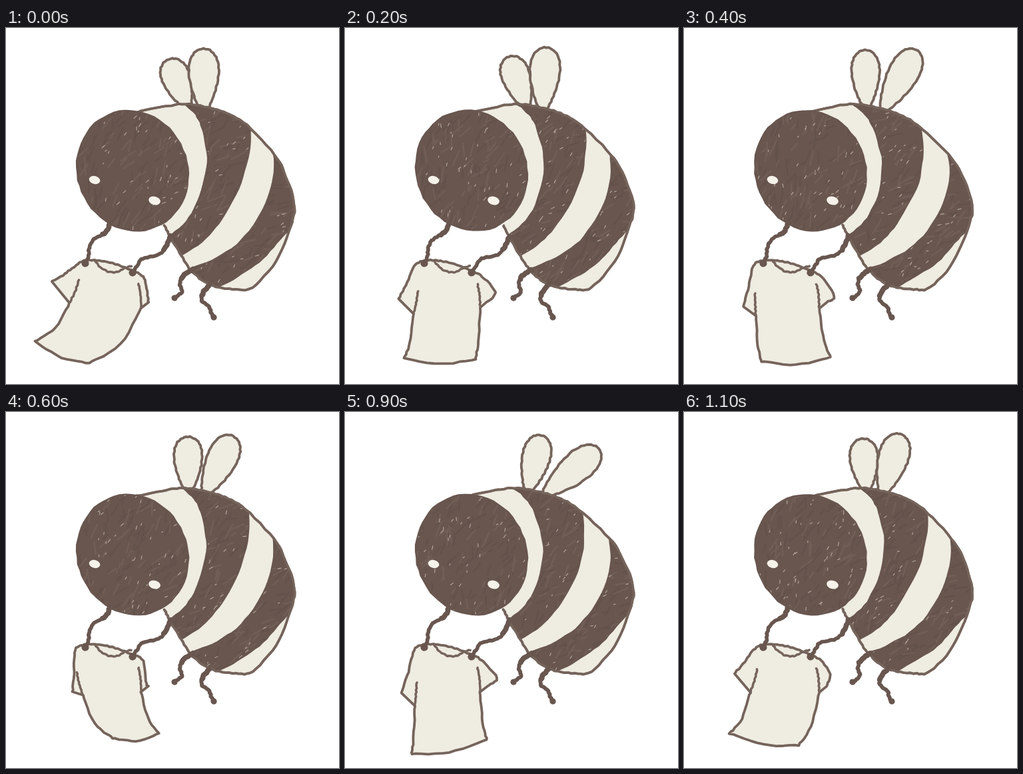
These frames come from a looping animation (500x534 px, 1200 ms). An HTML page with a canvas:

```html
<!DOCTYPE html>
<html lang="en">
<head>
<meta charset="utf-8">
<title>Bee shaking out a shirt</title>
<style>
html, body { margin: 0; width: 100%; height: 100%; overflow: hidden; background: #fff; }
canvas { display: block; }
</style>
</head>
<body>
<canvas id="stage" width="500" height="534"></canvas>
<script>
const ctx = document.getElementById('stage').getContext('2d');
const CREAM = '#efece2', LINE = '#75645b', DARK = '#68564f';
const STEP = 100;

const points = s => s.split(' ').map(p => p.split(',').map(Number));

// Each pose: tips of both wings, then both corners of the shirt's hem
const poses = [
  '244,47 297,31 43,470 125,503',
  '268,40 325,33 68,482 172,500',
  '246,43 302,29 89,495 196,497',
  '295,35 381,55 100,513 213,492',
  '272,33 349,33 116,500 220,494',
  '273,35 346,34 137,497 226,489',
  '273,37 341,36 160,489 230,482'
].map(points);

const BODY = points('191,126 230,118 262,114 295,119 325,128 356,146 400,190 419,222 433,265 427,298 405,350 370,389 345,392 315,388 294,378 275,360 261,338 246,312 238,296');
const FRONT_BAND = [
  points('256,111 278,130 291,156 300,202 291,252 271,290 241,315'),
  points('360,142 362,179 352,232 324,286 294,321 260,343')
];
const BACK_BAND = [
  points('399,187 400,224 386,271 353,319 310,348 268,364'),
  points('437,290 411,317 380,351 340,377 304,396')
];
const ARMS = [
  points('156,293 150,306 132,317 125,330 124,342 119,353'),
  points('247,312 240,328 229,340 205,346 198,355 190,367')
];
const LEGS = [
  points('280,362 266,372 261,384 264,396 253,405'),
  points('305,386 296,397 294,409 305,418 308,427 312,434')
];
const NECK = points('134,350 141,358 152,365 166,366 178,360 188,357');

let boil = 0;

// Samples a spline through the points
function smooth(pts) {
  const out = [pts[0]];
  for (let i = 0; i < pts.length - 1; i++) {
    const b = pts[i], c = pts[i + 1], a = pts[i - 1] || b, d = pts[i + 2] || c;
    for (let k = 1; k <= 6; k++) {
      const t = k / 6;
      out.push([0, 1].map(j => b[j] + t / 2 * (c[j] - a[j] +
        t * (2 * a[j] - 5 * b[j] + 4 * c[j] - d[j] + t * (3 * (b[j] - c[j]) + d[j] - a[j])))));
    }
  }
  return out;
}

// Samples a closed curve by angle
function around(at) {
  return Array.from({ length: 61 }, (_, i) => at(i / 60 * 2 * Math.PI));
}

// Joins points with a hand tremor that differs from pose to pose
function pathOf(pts) {
  const path = new Path2D();
  for (const [x, y] of pts) {
    path.lineTo(x + 0.6 * Math.sin(y * 0.9 + x * 0.3 + boil), y + 0.6 * Math.sin(x * 0.8 - y * 0.4 + boil));
  }
  return path;
}

function stroke(path, width, color = LINE) {
  ctx.lineWidth = width;
  ctx.strokeStyle = color;
  ctx.stroke(path);
}

function paper(pts) {
  const path = pathOf(pts);
  ctx.fillStyle = CREAM;
  ctx.fill(path);
  stroke(path, 3.8);
  return path;
}

function dot(x, y, rx, ry, color) {
  ctx.fillStyle = color;
  ctx.beginPath();
  ctx.ellipse(x, y, rx, ry, 0.25, 0, 7);
  ctx.fill();
}

function random(seed) {
  return () => (seed = (seed * 16807) % 2147483647) / 2147483647;
}

// Solid marker fill with streaks and small gaps of bare paper
function marker(path, rnd) {
  ctx.fillStyle = DARK;
  ctx.fill(path);
  ctx.save();
  ctx.clip(path);
  const dash = (count, len, width, color) => {
    const marks = new Path2D();
    for (let i = 0; i < count; i++) {
      const x = 100 + 340 * rnd(), y = 112 + 285 * rnd();
      const turn = 1 + x / 400 + 1.2 * rnd(), l = len * (0.4 + rnd());
      marks.moveTo(x, y);
      marks.lineTo(x + l * Math.cos(turn), y + l * Math.sin(turn));
    }
    stroke(marks, width, color);
  };
  dash(240, 18, 2.5, 'rgba(84,68,62,.22)');
  dash(200, 18, 2.5, 'rgba(142,122,112,.24)');
  dash(170, 4, 1.2, 'rgba(225,217,206,.6)');
  ctx.restore();
  stroke(path, 2, DARK);
}

// Teardrop from base to tip
function wing([bx, by], [tx, ty], width) {
  const dx = tx - bx, dy = ty - by, len = Math.hypot(dx, dy);
  paper(around(a => {
    const along = (1 - Math.cos(a)) / 2;
    const side = width * Math.sin(a) * (0.47 - 0.19 * Math.cos(a)) / len;
    return [bx + dx * along - dy * side, by + dy * along + dx * side];
  }));
}

function limb(pts, width, end) {
  const line = smooth(pts);
  stroke(pathOf(line), width, DARK);
  stroke(pathOf(line.slice(0, 9)), width + 2, DARK);
  dot(...line.at(-1), end, end, DARK);
}

function drawBody(index, rnd) {
  // The back rolls while the belly stays put
  const roll = 8 * Math.cos(index * Math.PI / 3.5);
  const lean = pts => smooth(pts.map(([x, y]) => [x + roll * Math.max(0, 240 - y) / 130, y]));
  const band = ([near, far], ...outside) =>
    marker(pathOf([...lean(near), ...lean(far).reverse(), ...outside, lean(near)[0]]), rnd);

  const body = paper(lean(BODY));
  ctx.save();
  ctx.clip(body);
  band(FRONT_BAND, [340, 90]);
  band(BACK_BAND, [480, 230], [430, 140]);
  ctx.restore();
  stroke(body, 3.4);
}

function drawHead(rnd) {
  const tilt = -0.4;
  marker(pathOf(around(a => {
    const x = 82.5 * Math.cos(a), y = 91.5 * Math.sin(a);
    return [190 + x * Math.cos(tilt) - y * Math.sin(tilt), 214 + x * Math.sin(tilt) + y * Math.cos(tilt)];
  })), rnd);
  dot(133, 228, 8.5, 6, '#f5f2ea');
  dot(223, 259, 9, 6.3, '#f5f2ea');
}

function drawShirt(index, hemL, hemR) {
  // The sleeves follow the swinging hem
  const pitL = [88 + 0.17 * hemL[0], 107 + 0.65 * hemL[1]];
  const pitR = [203, 420];
  const cuffL = [pitL[0] - 26 + 1.8 * index, pitL[1] - 32 + 4.5 * index];
  const cuffR = [211 + 17 * Math.sin(index * Math.PI / 6), 390 + 3 * index];
  const mid = (a, b, u, v) => [a[0] + (b[0] - a[0]) * u, a[1] + (b[1] - a[1]) * v];
  const sag = mid(hemL, hemR, 0.5, 0.5);
  const shoulder = [104, 357];

  paper([
    ...smooth([[190, 364], [164, 354], [140, 349], [118, 349], shoulder, mid(shoulder, cuffL, 0.45, 0.5), cuffL]),
    ...smooth([pitL, mid(pitL, hemL, 0.4, 0.65), hemL]),
    ...smooth([hemL, [sag[0], sag[1] + 8], hemR]),
    ...smooth([hemR, mid(pitR, hemR, 0.4, 0.65), pitR]),
    ...smooth([[pitR[0] + 11, pitR[1] - 9], cuffR, [206, 373], [190, 364]])
  ]);
  const seamL = [pitL[0] + 14 - 3.8 * index, pitL[1] - 34];
  const folds = [NECK, [seamL, mid(seamL, pitL, 0.4, 0.5), pitL], [[199, 384], [202, 400], pitR]];
  folds.forEach(f => stroke(pathOf(smooth(f)), 3.5));
}

function drawBee(index) {
  const [tipL, tipR, hemL, hemR] = poses[index];
  const rnd = random(index * 7919 + 8020);
  boil = index * 2;
  wing([274, 122], tipL, 42);
  wing([297, 126], tipR, 45);
  drawBody(index, rnd);
  drawHead(rnd);
  LEGS.forEach(l => limb(l, 5.8, 4.6));
  drawShirt(index, hemL, hemR);
  ARMS.forEach(a => limb(a, 5.6, 5.6));
}

ctx.lineJoin = ctx.lineCap = 'round';
const last = poses.length - 1;
let shown = -1;

// The poses play forwards, then backwards
function frame(now) {
  const beat = Math.floor(now / STEP) % (2 * last);
  const index = last - Math.abs(last - beat);
  if (index !== shown) {
    shown = index;
    ctx.clearRect(0, 0, 500, 534);
    drawBee(index);
  }
  requestAnimationFrame(frame);
}
frame(performance.now());
</script>
</body>
</html>
```
